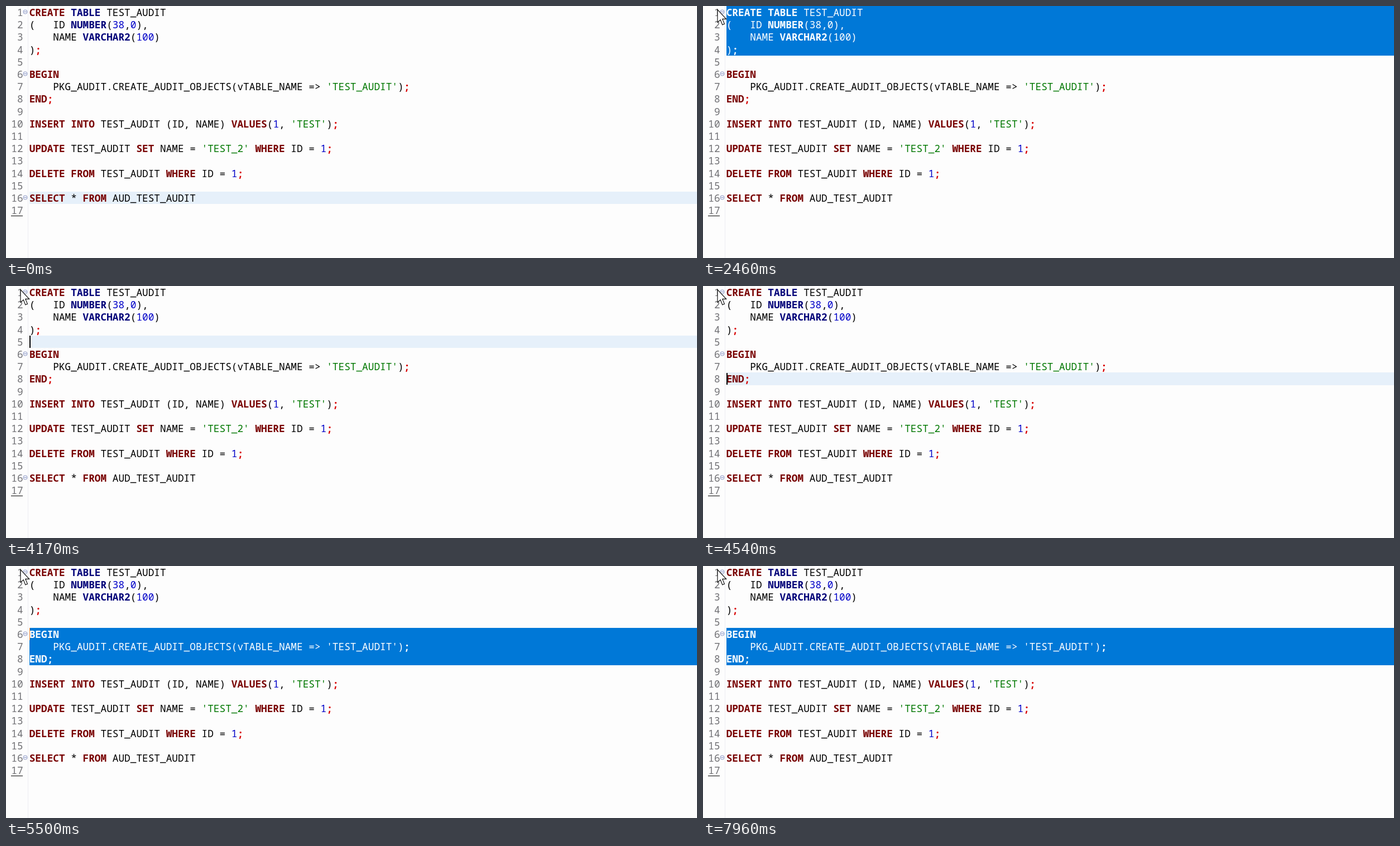
These frames come from a looping animation (1238 by 452 pixels, 8 s). An HTML page:

```html
<!DOCTYPE html>
<html lang="en">
<head>
<meta charset="utf-8">
<title>SQL editor</title>
<style>
  html, body { margin: 0; width: 100%; height: 100%; overflow: hidden; background: #fdfdfd; }
  #stage {
    position: relative; width: 1238px; height: 452px; overflow: hidden;
    font: 500 17.75px/22.2px "Noto Sans Mono", "DejaVu Sans Mono", monospace;
    font-variant-ligatures: none; color: #000;
  }
  #stage > * { position: absolute; }
  #rule { left: 39px; top: 0; width: 1px; height: 452px; background: #ececf2; }
  .num { left: 0; width: 30.6px; text-align: right; color: #707074; }
  .last { left: 9px; top: 376px; width: 21px; height: 1px; background: #000; }
  .code { left: 41.7px; right: 0; height: 22.2px; white-space: pre; }
  .code.on { background: #e6f0fa; }
  .code.sel { background: #0078d7; }
  .code.sel, .code.sel * { color: #fff; }
  b { color: #780000; }
  .type { color: #000078; }
  i { font-style: normal; }
  .digit { color: #0000c8; }
  .str { color: #007800; }
  .end { color: #d80000; font-weight: bold; }
  #caret { left: 42px; width: 2px; height: 21.6px; background: #000; }
  #caret.inv { background: #ff8728; width: 1px; }
  svg { left: 0; top: 0; overflow: visible; }
</style>
</head>
<body>
<div id="stage">
  <div id="rule"></div>
  <div class="last"></div>
</div>
<script>
const LOOP = 8000, PITCH = 22.2, BLINK = 535;
const sql = `CREATE TABLE TEST_AUDIT
(   ID NUMBER(38,0),
    NAME VARCHAR2(100)
);

BEGIN
    PKG_AUDIT.CREATE_AUDIT_OBJECTS(vTABLE_NAME => 'TEST_AUDIT');
END;

INSERT INTO TEST_AUDIT (ID, NAME) VALUES(1, 'TEST');

UPDATE TEST_AUDIT SET NAME = 'TEST_2' WHERE ID = 1;

DELETE FROM TEST_AUDIT WHERE ID = 1;

SELECT * FROM AUD_TEST_AUDIT
`;

const stage = document.getElementById("stage");
const token = /('[^']*')|\b(CREATE|BEGIN|END|INSERT|INTO|VALUES|UPDATE|SET|WHERE|DELETE|FROM|SELECT)\b|\b(TABLE|NUMBER|VARCHAR2)\b|\b(\d+)\b|;/g;

function paint(text) {
  return text.replace(token, (m, str, key, type, digit) =>
    str ? `<i class="str">${m}</i>` :
    key ? `<b>${m}</b>` :
    type ? `<b class="type">${m}</b>` :
    digit ? `<i class="digit">${m}</i>` : `<i class="end">${m}</i>`
  );
}

function add(cls, i, html) {
  const el = document.createElement("div");
  el.className = cls;
  el.style.top = i * PITCH + "px";
  el.innerHTML = html;
  stage.append(el);
  return el;
}

const rows = sql.split("\n").map((text, i) => {
  add("num", i, i + 1);
  return add("code", i, paint(text));
});

const folds = [1, 6, 16].map(n => {
  const y = (n - 1) * PITCH + 10.5;
  return `<circle cx="34.5" cy="${y}" r="3.6"/><path d="M32 ${y}h5"/>`;
}).join("");
stage.insertAdjacentHTML("beforeend", `
  <svg width="1238" height="452" fill="#f4f6fc" stroke="#8c98c4">${folds}</svg>
  <div id="caret"></div>
  <svg id="mouse" width="20" height="30">
    <path d="M0 0V23L5.2 18.2L8.8 27.2L12.4 25.6L8.8 16.8H15.6Z" fill="#fff" stroke="#111" stroke-width="1.2"/>
  </svg>`);
const caret = document.getElementById("caret");
const mouse = document.getElementById("mouse");

// eased 0..1 progress between two times
function ease(t, from, to) {
  const k = Math.min(1, Math.max(0, (t - from) / (to - from)));
  return k * k * (3 - 2 * k);
}

// repeats of a held key so far
function presses(t, from, period, max) {
  return t < from ? 0 : Math.min(max, 1 + Math.floor((t - from) / period));
}

function state(t) {
  const x = 52 - 26 * ease(t, 40, 280);
  const y = -36 + 110 * ease(t, 40, 280) - 67.5 * ease(t, 380, 790);
  if (t < 300) return { x, y, line: 16 };

  const down = presses(t, 3460, 230, 4) + presses(t, 4340, 85, 4);
  const up = presses(t, 4920, 205, 3);
  const dragged = Math.ceil(y / PITCH);
  const at = dragged + down - up;

  if (t < 3590) return { x, y, at, first: dragged, last: 4 };
  if (up) return { x, y, at, first: at, last: 8 };
  return { x, y, at, line: at };
}

function caretShown(t) {
  const since = t - (t < 3460 ? 840 : 5255);
  return since < 0 || Math.floor(since / BLINK) % 2 === 0;
}

function draw(t) {
  const { x, y, line, at, first, last } = state(t);
  rows.forEach((row, i) => {
    const n = i + 1;
    row.classList.toggle("on", n === line);
    row.classList.toggle("sel", n >= first && n <= last);
  });
  caret.style.visibility = at && caretShown(t) ? "visible" : "hidden";
  caret.style.top = ((at || 1) - 1) * PITCH + 0.3 + "px";
  caret.className = first ? "inv" : "";
  mouse.style.transform = `translate(${x}px, ${y}px)`;
}

const start = performance.now();
function tick() {
  draw((performance.now() - start) % LOOP);
  requestAnimationFrame(tick);
}
draw(0);
requestAnimationFrame(tick);
</script>
</body>
</html>
```
